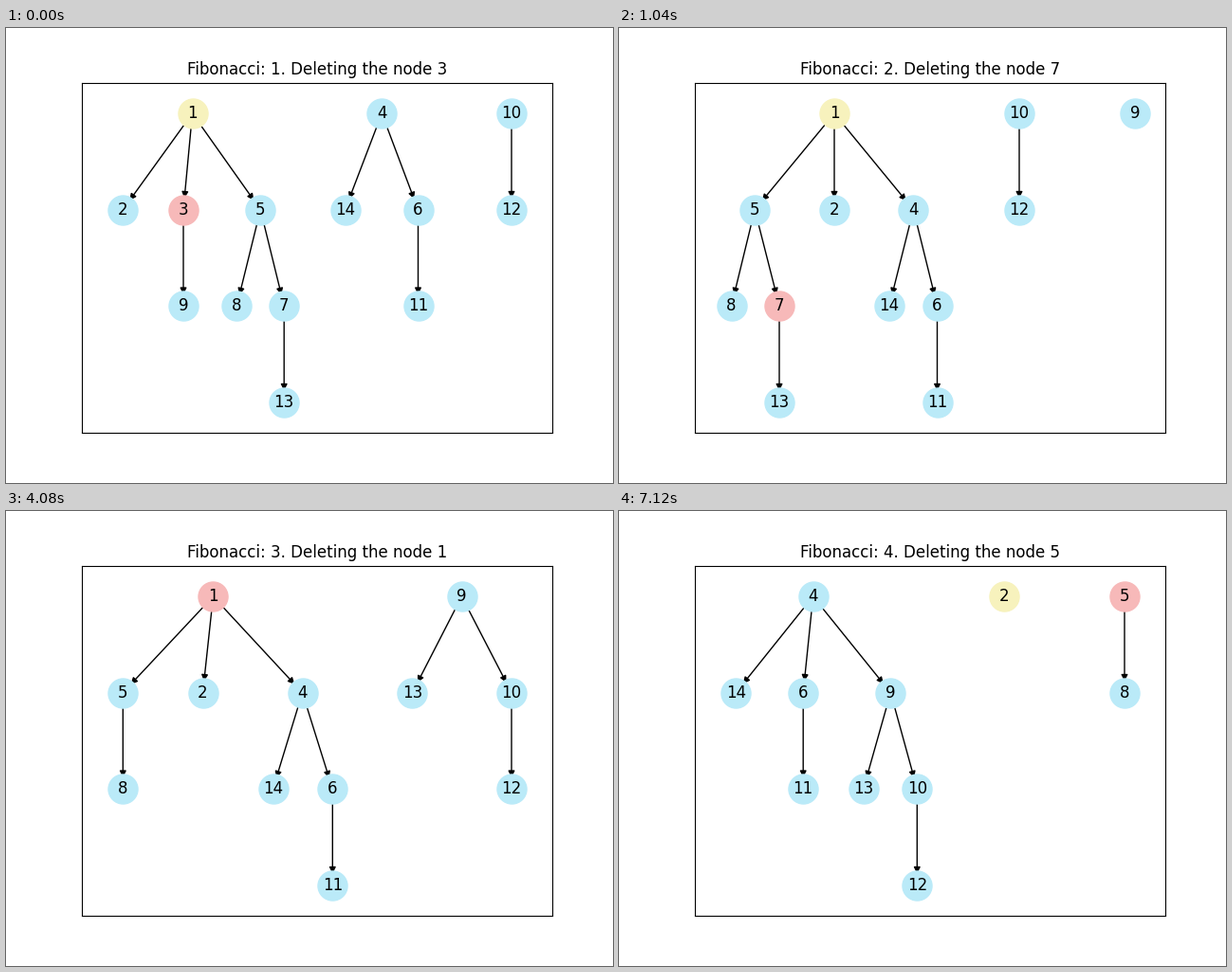
Write a matplotlib script that moves like this. It is 640 px wide and 480 px high and loops after 8000 ms.

```python
import matplotlib.pyplot as plt
import numpy as np
from matplotlib.animation import FuncAnimation
from matplotlib.patches import FancyArrowPatch

INTERVAL, LOOP = 20, 8000
FADE_STARTS, STEP, STEPS = (500, 3540, 6580), 60, 10
BLUE, YELLOW, PINK = "#baeaf8", "#f7f2bd", "#f7b9b9"
TOP, ROW = 90.15, 101.5
ARROW_GAP = 300 ** 0.5 / 2

plt.rcParams["font.family"] = "DejaVu Sans"
fig = plt.figure(figsize=(6.4, 4.8), dpi=100, facecolor="white")


def node(key, x, *children):
    return key, x, children


# Each heap: the deleted key, the minimum key, the root trees.
HEAPS = [
    (3, 1, [
        node(1, 196.5,
             node(2, 123.3),
             node(3, 187, node(9, 187)),
             node(5, 268.3, node(8, 243.3), node(7, 293.2, node(13, 293.2)))),
        node(4, 396.3, node(14, 357.5), node(6, 434.5, node(11, 434.5))),
        node(10, 533, node(12, 533)),
    ]),
    (7, 1, [
        node(1, 227,
             node(5, 143.2, node(8, 118.5), node(7, 169, node(13, 169))),
             node(2, 227),
             node(4, 310.4, node(14, 285), node(6, 335.5, node(11, 335.5)))),
        node(10, 422, node(12, 422)),
        node(9, 544.3),
    ]),
    (1, 1, [
        node(1, 218.4,
             node(5, 123.3, node(8, 123.3)),
             node(2, 207.5),
             node(4, 312.5, node(14, 281.5), node(6, 344.3, node(11, 344.3)))),
        node(9, 480.5, node(13, 428.4), node(10, 533, node(12, 533))),
    ]),
    (5, 2, [
        node(4, 204.6,
             node(14, 123.3),
             node(6, 194.2, node(11, 194.2)),
             node(9, 286.4, node(13, 257.7), node(10, 314.3, node(12, 314.3)))),
        node(2, 406.3),
        node(5, 533, node(8, 533)),
    ]),
]


def draw_tree(ax, tree, colors, depth=0):
    key, x, children = tree
    y = TOP + ROW * depth
    ax.scatter([x], [y], s=500, c=colors.get(key, BLUE), zorder=2)
    ax.text(x, y, str(key), size=12, ha="center", va="center", zorder=3)
    for child in children:
        ax.add_patch(FancyArrowPatch(
            (x, y), (child[1], y + ROW), arrowstyle="-|>", mutation_scale=10,
            shrinkA=ARROW_GAP, shrinkB=ARROW_GAP, lw=1, color="black", zorder=1))
        draw_tree(ax, child, colors, depth + 1)


def render_heap(number, deleted, minimum, trees):
    fig.clear()
    ax = fig.add_axes([0.125, 0.11, 0.775, 0.77])
    ax.set(xlim=(80, 576), ylim=(427.2, 57.6), xticks=[], yticks=[])
    ax.set_title(f"Fibonacci: {number}. Deleting the node {deleted}", size=12)
    for tree in trees:
        draw_tree(ax, tree, {minimum: YELLOW, deleted: PINK})
    fig.canvas.draw()
    return np.array(fig.canvas.buffer_rgba())[..., :3] / 255


scenes = [render_heap(i, *heap) for i, heap in enumerate(HEAPS, 1)]
fig.clear()
picture = fig.figimage(scenes[0])


def update(frame):
    t = frame * INTERVAL
    image = scenes[0]
    for start, scene in zip(FADE_STARTS, scenes[1:]):
        if t >= start:
            mix = min((t - start) // STEP + 1, STEPS) / STEPS
            image = image * (1 - mix) + scene * mix
    picture.set_data(image)
    return [picture]


anim = FuncAnimation(fig, update, frames=LOOP // INTERVAL, interval=INTERVAL,
                     repeat=True, repeat_delay=0)
plt.show()
```
